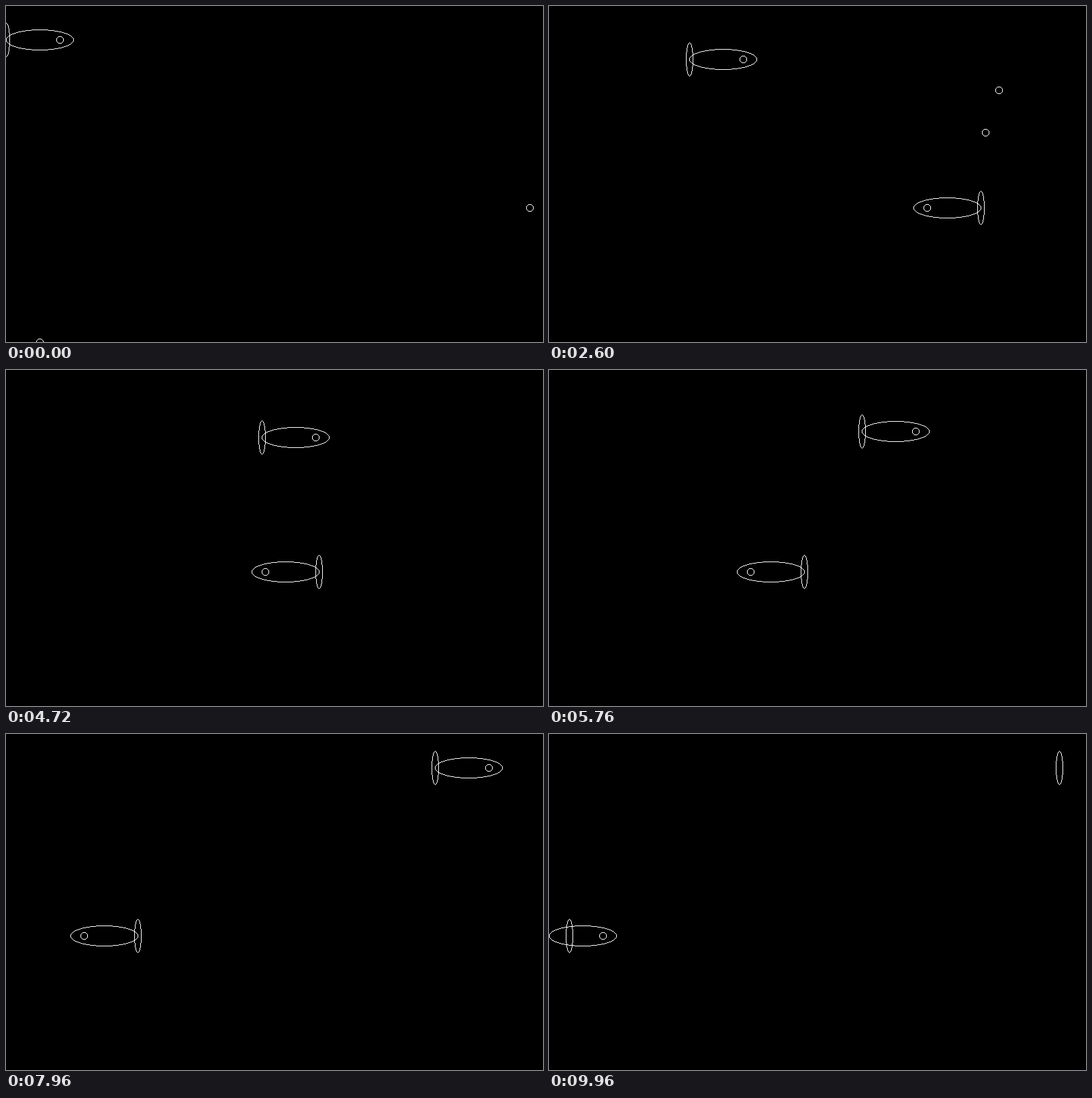
Write an HTML page with a canvas that moves like this. It is 800x500 px and loops after 10 s.

```html
<!DOCTYPE html>
<html lang="en">
<head>
<meta charset="utf-8">
<title>Two fish</title>
<style>
  html, body { margin: 0; height: 100%; overflow: hidden; background: #000; }
  canvas { display: block; }
</style>
</head>
<body>
<canvas width="800" height="500"></canvas>
<script>
const ctx = document.querySelector('canvas').getContext('2d');
const W = 800, H = 500, STEP = 40, STEPS = 250;
const SPEED = 10 / 3; // swimming, px per step

// One-pixel outline without smoothing; skipped when the centre is off stage
function ellipse(cx, cy, a, b) {
  cx = Math.floor(cx);
  cy = Math.floor(cy);
  if (cx < 0 || cx > W || cy < 0 || cy > H) return;
  const plot = (x, y) => {
    for (const sx of [-x, x])
      for (const sy of [-y, y]) ctx.fillRect(cx + sx, cy + sy, 1, 1);
  };
  for (let x = 0; x <= a; x++) {
    const y = b * Math.sqrt(1 - (x / a) ** 2);
    if (b * b * x <= a * a * y) plot(x, Math.round(y));
  }
  for (let y = 0; y <= b; y++) {
    const x = a * Math.sqrt(1 - (y / b) ** 2);
    if (b * b * x >= a * a * y) plot(Math.round(x), y);
  }
}

const body = (x, y) => ellipse(x, y, 50, 15);
const tail = (x, y) => ellipse(x, y, 5, 25);
const dot = (x, y) => ellipse(x, y, 5, 5);

// Point at a given distance along the dive-and-rise route
const route = [[0, 50], [150, 50], [250, 100], [450, 100], [550, 50], [900, 50]];
function along(distance) {
  for (let i = 1; ; i++) {
    const [x, y] = route[i - 1];
    const dx = route[i][0] - x, dy = route[i][1] - y;
    const length = Math.hypot(dx, dy);
    if (distance <= length || i === route.length - 1)
      return [x + dx * distance / length, y + dy * distance / length];
    distance -= length;
  }
}

function draw(n) {
  ctx.fillStyle = '#000';
  ctx.fillRect(0, 0, W, H);
  ctx.fillStyle = '#fff';

  const swum = n * 10 / 3;
  const [x, y] = along(swum);
  tail(Math.min(x, 760), y);
  body(x + 50, y);
  dot(x + 80, y);

  tail(Math.max(860 - swum, 30), 300);
  body(Math.max(810 - swum, 50), 300);
  dot(Math.max(780 - swum, 80), 300);

  // Bubbles: the right pair follows one second later
  for (const [left, delay] of [[50, 0], [650, 25]]) {
    const age = n - delay;
    dot(left, 500 - age * 70 / 9);
    dot(left + 20, 525 - age * 10);
  }
}

function tick() {
  draw(Math.floor(performance.now() / STEP + 1e-6) % STEPS);
  requestAnimationFrame(tick);
}
tick();
</script>
</body>
</html>
```
